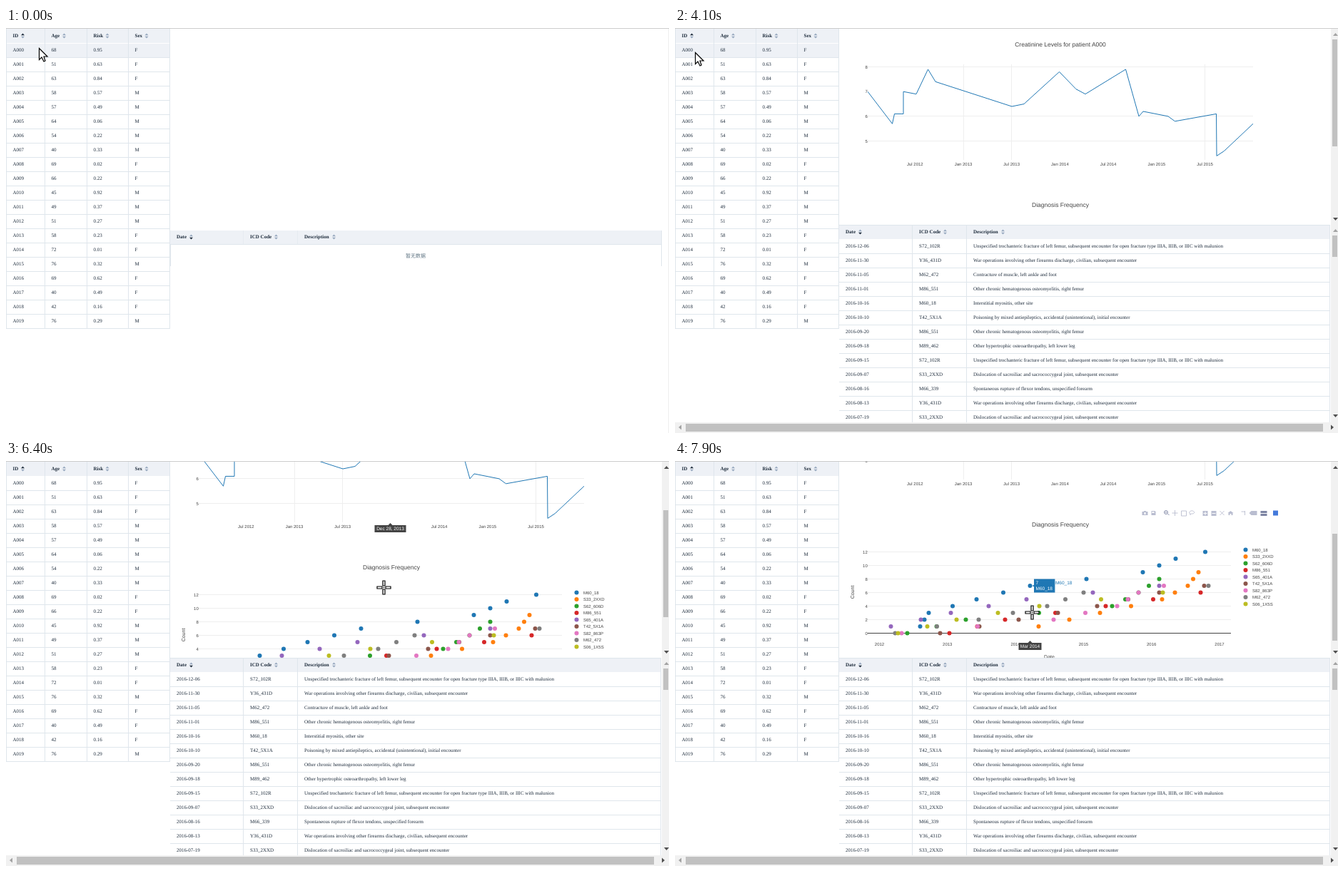
Write an HTML page that moves like this. It is 929x568 px and loops after 8000 ms.

```html
<!DOCTYPE html>
<html lang="en">
<head>
<meta charset="utf-8">
<title>Patient dashboard</title>
<style>
  html, body { margin: 0; width: 100%; height: 100%; overflow: hidden; background: #fff; }
  svg { display: block; }
  text { text-rendering: geometricPrecision; white-space: pre; }
  .table { font: 7px "Liberation Serif", serif; fill: #1f2d3d; }
  .table .head { font-weight: bold; }
  .chart { font: 6px "Liberation Sans", Arial, sans-serif; fill: #444; }
  .title { font-size: 8.5px; }
  .axis { font-size: 7px; }
  .hover { font-size: 6.5px; }
  .mid { text-anchor: middle; }
  .end { text-anchor: end; }
</style>
</head>
<body>
<svg id="stage" width="929" height="568" viewBox="0 0 929 568"></svg>
<script>
const LOOP = 8000, STEP = 100;
const BORDER = '#dfe6ec', SHADE = '#eef1f6', GRID = '#eee', BLUE = '#1f77b4';
const MONTHS = 'Jan Feb Mar Apr May Jun Jul Aug Sep Oct Nov Dec'.split(' ');

const text = (x, y, s, cls = '', attrs = '') =>
  `<text x="${x}" y="${y}" dy=".35em" class="${cls}" ${attrs}>${s}</text>`;
const rect = (x, y, w, h, fill, attrs = '') =>
  `<rect x="${x}" y="${y}" width="${w}" height="${h}" fill="${fill}" ${attrs}/>`;
const hLine = (x1, x2, y, color = BORDER) => rect(x1, y, x2 - x1, 1, color);
const vLine = (x, y1, y2, color = BORDER) => rect(x, y1, 1, y2 - y1, color);
const path = (d, fill, attrs = '') => `<path d="${d}" fill="${fill}" ${attrs}/>`;
const group = (id, content, attrs = '') => `<g id="${id}" ${attrs}>${content}</g>`;
const each = (list, draw) => list.map(draw).join('');
const range = n => [...Array(n).keys()];

// Linear interpolation through [position, ...values] keys.
function at(keys, t) {
  const next = keys.findIndex(k => k[0] > t);
  if (next < 0) return keys[keys.length - 1].slice(1);
  const [t0, ...from] = keys[next - 1], [t1, ...to] = keys[next];
  return from.map((v, i) => v + (to[i] - v) * (t - t0) / (t1 - t0));
}

// ---- tables ----
function sortIcon(x, y, active) {
  const color = dir => dir === active ? '#1f2d3d' : '#97a8be';
  return path(`M${x - 2.5} ${y - .8}h5l-2.5-2.7z`, color('up')) +
         path(`M${x - 2.5} ${y + .8}h5l-2.5 2.7z`, color('down'));
}

const heading = ([label, x, iconX, active], y) => text(x, y, label, 'head') + sortIcon(iconX, y, active);
const rowCells = (columns, y, cells) => each(cells, (cell, c) => text(columns[c][1], y, cell));

const patientColumns = [['ID', 9.5, 23.5, 'up'], ['Age', 63.5, 81.5], ['Risk', 122.5, 142], ['Sex', 180.5, 197]];
const patients = `68 0.95 F,51 0.63 F,63 0.84 F,58 0.57 M,57 0.49 M,64 0.06 M,54 0.22 M,40 0.33 M,
69 0.02 F,66 0.22 F,45 0.92 M,49 0.37 M,51 0.27 M,58 0.23 F,72 0.01 F,76 0.32 M,69 0.62 F,
40 0.49 F,42 0.16 F,76 0.29 M`.split(',').map((row, i) =>
  ['A0' + String(i).padStart(2, '0'), ...row.trim().split(' ')]);

const patientTable = () =>
  rect(0, 1, 230, 20, SHADE) + rect(1, 22, 228, 19, SHADE, 'id="rowHover"') +
  each(patientColumns, column => heading(column, 11)) +
  vLine(229, 1, 422) + each(patientColumns, ([, x]) => vLine(Math.floor(x - 9), 1, 422)) +
  each(patients, (cells, i) => hLine(0, 230, 41 + 20 * i) + rowCells(patientColumns, 31 + 20 * i, cells));

const diagnosisColumns = [['Date', 239, 259.5, 'down'], ['ICD Code', 342, 378.5], ['Description', 418, 459.5]];
const diagnosisHead = y => each(diagnosisColumns, column => heading(column, y));

const emptyTable = () =>
  rect(230, 284, 689, 19, SHADE) + hLine(230, 919, 303) +
  each([332, 408], x => vLine(x, 284, 303, '#e6ebf1')) +
  vLine(230, 303, 334) + vLine(918, 284, 334) + diagnosisHead(293) +
  text(574, 320, '暂无数据', 'mid', 'fill="#5e7382" font-family="Noto Sans CJK SC, Noto Sans CJK, sans-serif"');

const FRACTURE = 'S72_102R|Unspecified trochanteric fracture of left femur, subsequent encounter for open fracture type IIIA, IIIB, or IIIC with malunion';
const WAR = 'Y36_431D|War operations involving other firearms discharge, civilian, subsequent encounter';
const OSTEO = 'M86_551|Other chronic hematogenous osteomyelitis, right femur';
const DISLOCATION = 'S33_2XXD|Dislocation of sacroiliac and sacrococcygeal joint, subsequent encounter';
const diagnoses = [
  '12-06|' + FRACTURE, '11-30|' + WAR,
  '11-05|M62_472|Contracture of muscle, left ankle and foot',
  '11-01|' + OSTEO, '10-16|M60_18|Interstitial myositis, other site',
  '10-10|T42_5X1A|Poisoning by mixed antiepileptics, accidental (unintentional), initial encounter',
  '09-20|' + OSTEO, '09-18|M89_462|Other hypertrophic osteoarthropathy, left lower leg',
  '09-15|' + FRACTURE, '09-07|' + DISLOCATION,
  '08-16|M66_339|Spontaneous rupture of flexor tendons, unspecified forearm',
  '08-13|' + WAR, '07-19|' + DISLOCATION,
];

const filledTable = () =>
  rect(230, 276, 689, 277, '#fff') + rect(230, 276, 688, 20, SHADE) + hLine(230, 918, 276) +
  diagnosisHead(286) + each([332, 408, 917], x => vLine(x, 277, 553)) +
  each(diagnoses, (entry, i) =>
    hLine(230, 918, 316 + 20 * i) + rowCells(diagnosisColumns, 306 + 20 * i, ('2016-' + entry).split('|')));

// ---- scroll bars ----
const DARK = '#505050', DIM = '#a3a3a3', THUMB = '#c1c1c1';
const vArrow = (y, dir, color, attrs) => path(`M922 ${y + dir}h7l-3.5 ${-4 * dir}z`, color, attrs);
const scrollBars = () =>
  rect(919, 1, 10, 552, '#f1f1f1') + rect(0, 553, 929, 15, '#f1f1f1') +
  vArrow(10, 1, DIM, 'id="upArrow"') + vArrow(267, -1, DARK) + rect(921, 16, 7, 150, THUMB, 'id="thumb"') +
  vArrow(285, 1, DIM) + vArrow(543, -1, DARK) + rect(921, 291, 7, 30, THUMB) +
  rect(15, 555, 893, 11, THUMB) +
  path('M9 556.5v7l-4-3.5z', DIM) + path('M919 556.5v7l4-3.5z', DARK);

// ---- chart toolbar ----
const solidIcons = {
  camera: 'M-4-2h2l1-1h2l1 1h2v5h-8zM-1-1v3h2v-3z',
  disk: 'M-3-3h5l1 1v5h-6zM-2-2v2h3v-2z',
  zoomIn: 'M-3-3h7v7h-7zM-2 0v1h2v2h1v-2h2v-1h-2v-2h-1v2z',
  zoomOut: 'M-3-3h7v7h-7zM-2 0v1h5v-1z',
  home: 'M-4 0l4-3l4 3h-1v3h-2v-2h-2v2h-2v-3z',
  closest: 'M-6 0l3-3h8v6h-8z',
  compare: 'M-4-3h9v3h-9zM-4 1h9v3h-9z',
};
const lineIcons = {
  zoom: 'M-3-1a2 2 0 1 0 5 0a2 2 0 1 0-5 0M2 1l2 2M-2-1h3',
  pan: 'M-4 0h8M0-4v8',
  box: 'M-3-3h7v7h-7z',
  lasso: 'M-2 2c-4-3 0-6 3-5s3 4-1 4s-3 1-2 2',
  fit: 'M-3-3l6 6M3-3l-6 6',
  spike: 'M-3-2h5M2-3v6',
};

// Right aligned: groups of icons, each with its own spacing.
function modebar(id, y, tools) {
  let x = 840.5, out = rect(838, y - 3.5, 7, 7, '#447adb');
  for (const [gap, names] of [[14, 'spike closest compare'], [12, 'zoomIn zoomOut fit home'], [12, tools], [12, 'camera disk']]) {
    x -= 16 - gap;
    for (const name of names.split(' ').reverse()) {
      const color = /^(zoom|compare)$/.test(name) ? '#7d84a3' : '#b9bdd0';
      x -= x > 840 ? 14 : gap;
      const place = `transform="translate(${x} ${y})"`;
      out += solidIcons[name] ? path(solidIcons[name], color, `${place} fill-rule="evenodd"`)
        : path(lineIcons[name], 'none', `${place} stroke="${color}" stroke-width=".9"`);
    }
    x -= 2;
  }
  return group(id, out);
}

// ---- charts ----
const levelY = v => 54.5 + (8 - v) * 34.7;
const levels = [[270, 7], [304.5, 5.7], [307.5, 6.1], [320, 6.1], [320, 7], [338, 6.9], [354.5, 7.9], [365, 7.4],
  [472, 6.4], [489, 6.5], [538.5, 7.8], [562, 7.1], [575, 6.9], [631.5, 7.9], [650, 6], [656, 6.2], [691, 6],
  [700.5, 5.8], [758.5, 6.1], [759, 4.4], [769.5, 4.6], [810, 5.7]];

const levelChart = () =>
  text(540, 23, 'Creatinine Levels for patient A000', 'title mid') +
  each([8, 6, 5], v => hLine(270, 810, Math.floor(levelY(v)), GRID)) +
  each([404, 471, 742], x => vLine(x, 51, 185, GRID)) +
  each([8, 7, 6, 5], v => text(269.8, levelY(v), v, 'end')) +
  each(range(7), i => text(336.3 + 67.7 * i, 191, `${i % 2 ? 'Jan' : 'Jul'} ${2012 + (i + 1 >> 1)}`, 'mid')) +
  path('M' + levels.map(([x, v]) => [x, levelY(v)]).join('L'), 'none', `stroke="${BLUE}" stroke-linejoin="round"`);

// Counts climb by one; x is keyed at every second count from the first and interpolated between.
const series = [
  ['M60_18', BLUE, 1, 12, [343, 355, 422, 497, 655, 701, 784]],
  ['S33_2XXD', '#ff7f0e', 1, 9, [509, 595, 682, 718, 733]],
  ['S62_606D', '#2ca02c', 0, 8, [325, 407, 612, 649, 678]],
  ['M86_551', '#d62728', 0, 6, [384, 462, 603, 736]],
  ['S65_401A', '#9467bd', 1, 7, [302, 386, 492, 678]],
  ['T42_5X1A', '#8c564b', 0, 7, [371, 481, 591, 678, 804]],
  ['S82_863P', '#e377c2', 0, 7, [317, 530, 619, 649, 720]],
  ['M62_472', '#7f7f7f', 0, 7, [308, 425, 521, 572, 922]],
  ['S06_1X5S', '#bcbd22', 0, 6, [312, 394, 510, 683]],
];
const countY = n => 400.5 - 9.5 * n;
const dots = series.flatMap(([name, color, first, last, xs]) => {
  const keys = xs.map((x, i) => [first + 2 * i, x]);
  return range(last - first + 1).map(i => {
    const n = first + i;
    return { x: at(keys, n)[0] + .5, y: countY(n), n, name, color };
  });
});
const dot = (x, y, color) => `<circle cx="${x}" cy="${y}" r="3" fill="${color}"/>`;

const frequencyChart = () =>
  text(540, 248, 'Diagnosis Frequency', 'title mid') +
  each([0, 2, 4, 6, 8, 10, 12], n =>
    hLine(270, 779, countY(n) - .5, n ? GRID : '#444') + text(269.8, countY(n), n, 'end')) +
  each(range(6), i => text(286.5 + 95.3 * i, 416, 2012 + i, 'mid')) +
  text(524.5, 434, 'Date', 'axis mid') +
  text(0, 0, 'Count', 'axis mid', 'transform="translate(249 343) rotate(-90)"') +
  each(dots, d => dot(d.x, d.y, d.color)) +
  each(series, ([name, color], i) => dot(799.5, 283.5 + 9.5 * i, color) + text(809, 283.5 + 9.5 * i, name));

// ---- hover labels ----
const axisLabel = (x, y, s, width) =>
  path(`M${x - 3} ${y - 5}l3-3l3 3z`, '#444') + rect(x - width / 2, y - 5, width, 10, '#444') +
  text(x, y, s, 'hover mid', 'fill="#fff"');

const valueBox = (x, y, w, h, color) =>
  path(`M${x} ${y}l6-3v6z`, color) + rect(x + 3, y - h / 2, w, h, color, `stroke="${color}"`);

const nearest = (items, x, getX) =>
  items.reduce((best, item) => Math.abs(getX(item) - x) < Math.abs(getX(best) - x) ? item : best);

function levelHover(cursorX) {
  const [x, value] = nearest(levels, cursorX, p => p[0]), y = levelY(value);
  const date = new Date(Date.UTC(2012, 6, 1 + Math.round((x - 335.9) / .3717)));
  const label = `${MONTHS[date.getUTCMonth()]} ${date.getUTCDate()}, ${date.getUTCFullYear()}`;
  return valueBox(x, y, 14, 10, BLUE) + text(x + 10, y, value, 'hover mid', 'fill="#fff"') +
    axisLabel(x, 194, label, 44);
}

function frequencyHover(cursorX) {
  const { x, y, n, name, color } = nearest(dots, cursorX, d => d.x);
  const month = Math.floor((x - 286.5) / 95.3 * 12);
  const width = name.length * 3.9 + 5, right = x + 6 + width;
  return rect(right, y - 9, width - 3, 18, '#fff') + valueBox(x + 3, y, width, 18, color) +
    text(x + 8, y - 4, n, 'hover', 'fill="#fff"') + text(x + 8, y + 4, name, 'hover', 'fill="#fff"') +
    text(right + 1, y - 4, name, 'hover', `fill="${color}"`) +
    axisLabel(x, 419, `${MONTHS[month % 12]} ${2012 + Math.floor(month / 12)}`, 32);
}

// ---- cursors ----
const OUTLINE = 'stroke="#000" stroke-width="1.2"';
const cursors = () =>
  path('M.5.5V16.5L4 13L7 19L9 18L7 12H12Z', '#fff', `id="arrow" ${OUTLINE}`) +
  group('cross', each([0, 90, 180, 270], a => path('M-1.5-2.5h3v-7h-3z', '#fff', `${OUTLINE} transform="rotate(${a})"`)) +
    rect(-.7, -.7, 1.4, 1.4, '#000'));

stage.innerHTML =
  hLine(0, 929, 0, '#ccc') + vLine(928, 1, 568, '#eee') +
  group('patients', patientTable(), 'class="table"') +
  `<svg x="230" y="1" width="689" height="275" viewBox="230 1 689 275">` +
  group('content', group('levelChart', levelChart()) + group('frequencyChart', frequencyChart()) +
    modebar('levelBar', 7, 'zoom pan') + modebar('frequencyBar', 232, 'zoom pan box lasso') +
    group('hover', ''), 'class="chart"') +
  `</svg>` +
  group('empty', emptyTable(), 'class="table"') +
  group('filled', filledTable() + scrollBars(), 'class="table"') + cursors();

// ---- motion ----
const cursorKeys = [[0, 46, 28], [100, 42, 28], [500, 42, 28], [900, 39, 35], [1000, 39, 35], [1200, 28, 34],
  [4600, 28, 34], [5500, 534, 170], [5700, 529, 177], [7200, 529, 177], [7900, 500, 212]];

const clamp = v => Math.max(0, Math.min(1, v));
const scrollAt = t => t < 6000 ? 0 : Math.round(159 - 155 * (1 - clamp((t - 6000) / 1142)) ** 2.2);

const el = id => document.getElementById(id);
const show = (id, on) => el(id).style.display = on ? '' : 'none';

function render(t) {
  const [x, y] = at(cursorKeys, t), scroll = scrollAt(t);
  const overPlot = x >= 270, loaded = t >= 4100;
  show('levelChart', t >= 2300);
  show('frequencyChart', loaded);
  show('empty', !loaded);
  show('filled', loaded);
  show('rowHover', x < 230);
  el('rowHover').setAttribute('y', 22 + 20 * Math.floor((y - 21) / 20));
  el('content').setAttribute('transform', `translate(0 ${-scroll})`);
  el('thumb').setAttribute('y', Math.round(16 + scroll * .54));
  el('upArrow').setAttribute('fill', scroll ? DARK : DIM);
  el('levelBar').style.opacity = t < 6900 ? clamp((t - 5200) / 400) : 0;
  el('frequencyBar').style.opacity = t >= 6900 ? 1 : 0;
  el('hover').innerHTML = !overPlot ? '' : t < 6900 ? levelHover(x) : t >= 7300 ? frequencyHover(x) : '';
  show('arrow', !overPlot);
  show('cross', overPlot);
  el('arrow').setAttribute('transform', `translate(${x} ${y})`);
  el('cross').setAttribute('transform', `translate(${x + .5} ${y + .5})`);
}

const start = performance.now();
function frame() {
  const t = (performance.now() - start) % LOOP;
  render(Math.floor(t / STEP) * STEP);
  requestAnimationFrame(frame);
}
frame();
</script>
</body>
</html>
```
